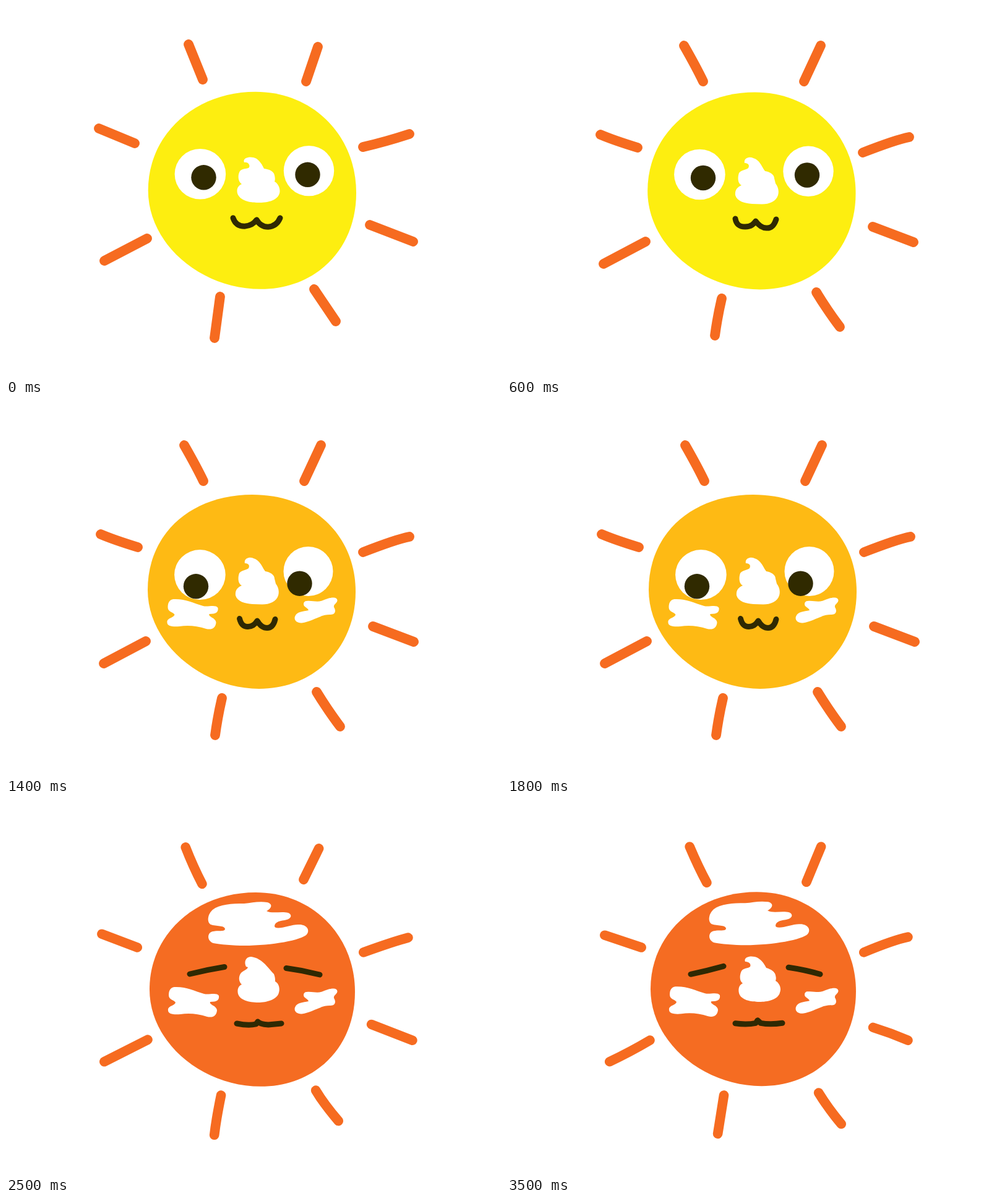
These frames come from a looping animation (800 by 600 pixels, 3600 ms). An HTML page:

```html
<!DOCTYPE html>
<html lang="en">
<head>
<meta charset="utf-8">
<title>Sunscreen sun</title>
<style>
  html, body { margin: 0; width: 100%; height: 100%; overflow: hidden; background: #fff; }
  svg { display: block; width: 800px; height: 600px; }
  .line { fill: none; stroke-width: 9; stroke: #2f2903; stroke-linecap: round; stroke-linejoin: round; }
  #rays { fill: none; stroke: #f66b20; stroke-width: 15.8; stroke-linecap: round; }
  .white, #nose { fill: #fff; }
  .pupil { fill: #302a00; }
</style>
</head>
<body>
<svg viewBox="0 0 800 600">
  <defs>
    <path id="body" d="M403 139C495 139 565 209 565 302C565 393 500 457 411 457C317 457 230 386 230 298C230 206 307 139 403 139Z"/>
    <path id="cheekL" d="M272 296C290 295 304 302 320 307C328 309 340 304 344 310C345 317 341 320 330 320C328 325 341 326 341 334C340 343 334 346 325 344C310 339 295 338 282 340C272 341 262 340 262 334C261 326 272 327 274 321C272 317 263 317 263 309C263 301 266 297 272 296Z"/>
    <path id="cheekR" d="M486 304C496 303 503 307 512 303C520 299 535 295 535.5 303C535 308 529 309 530 314C534 320 532 327 523 326C508 326 495 337 478 339.5C470 340 465 335 467 329C470 321 480 321 489 319C487 314 481 314 481 309C481 306 483 304 486 304Z"/>
  </defs>

  <g id="rays">
    <path data-pose="0" d="M295 62L318 119M504 66L485 122M150 198L208 222M577 228Q612 220 652 207M588 354L658 381M228 376L159 412M346 470L337 537M498 458L533 510"/>
    <path data-pose="1" d="M287 63Q299 94 314 123M505 65L480 116M150 205L208 227M578 235Q628 217 651 211M591 353L658 379M225 378L154 414M345 469Q337 508 334 534M500 461Q513 483 537 511"/>
    <path data-pose="2" d="M286 64Q306 99 317 122M507 64L480 122M151 208Q172 217 211 229M575 237Q629 216 650 212M591 357L657 382M224 381L156 417M347 473Q340 503 336 533M500 463Q519 494 538 519"/>
    <path data-pose="3" d="M292 62Q306 95 320 121M507 62L483 120M153 207L213 227M577 235Q625 215 649 210M592 358Q621 367 649 379M227 379Q195 398 161 414M348 469L338 532M503 465Q519 491 540 516"/>
  </g>

  <g id="face">
    <g data-mood="0">
      <use href="#body" fill="#fdee10" transform="translate(227.2 139.5) scale(1.004 1.003) translate(-230 -139)"/>
      <g class="white">
        <ellipse cx="311.4" cy="272.5" rx="41.3" ry="40.8"/>
        <circle cx="487" cy="267.3" r="40.7"/>
      </g>
      <g class="pupil">
        <circle cx="317" cy="278" r="20.2"/>
        <circle cx="485" cy="273.5" r="20.2"/>
      </g>
      <path class="line" data-pose="013" d="M364.5 343.5Q369 357 383 357Q396 356 402.5 346.5Q409 358 421 358Q435 357 440.5 343.5"/>
      <path class="line" data-pose="2" d="M369 344C371 355 377 357 385 357C395 357 399 352 402 348C407 355 412 359 419 359C428 360 432 354 435 345"/>
    </g>

    <g data-mood="1">
      <path fill="#feba14" d="M398 145C498 145 565 212 565 302C565 393 498 459 409 459C317 459 229 386 229 299C229 207 300 145 398 145Z"/>
      <g class="white">
        <ellipse cx="313.4" cy="274.6" rx="41.3" ry="40.5"/>
        <circle cx="488.5" cy="269" r="40"/>
        <use href="#cheekL" x="-1.5" y="18"/>
        <use href="#cheekR" x="0" y="13"/>
      </g>
      <g class="pupil">
        <circle cx="307" cy="293.3" r="20.2"/>
        <circle cx="474.5" cy="288.7" r="20.2"/>
      </g>
      <path class="line" d="M377.5 345.5C380 356 385 358.5 391 358.5C398 358.5 403 354 406 349C410 356 416 360.5 422 360.5C429 360.5 433 355 435 346.5"/>
    </g>

    <g data-mood="2" transform="translate(-1 0)">
      <use href="#body" fill="#f56c22" transform="translate(232 143) scale(.991 .987) translate(-230 -139)"/>
      <g class="white">
        <path d="M385 161C397 160 408 157 422 159C433 162 428 170 421 173C430 178 445 173 456 176C463 179 462 186 450 188C440 189 434 192 434 198C437 205 460 195 472 195C486 194 492 204 486 211C478 220 430 229 385 229C368 229 345 227 335 225C324 221 325 207 335 206C343 204 354 207 354 202C353 196 340 198 331 195C324 191 326 178 334 171C345 162 365 161 385 161Z"/>
        <use href="#cheekL"/>
        <use href="#cheekR"/>
      </g>
      <path class="line" data-pose="12" d="M297 275Q325 268 353 263.5M453 265.5Q480 269 507 276M373 355Q392 359 404 356L407 352Q410 356 424 357L445 355"/>
      <path class="line" data-pose="03" d="M297 276Q325 270 350 263M455 265Q482 269 506 276M369 355.5Q388 358 402 355L405 350.5L410 355Q425 358 445 355"/>
    </g>
  </g>

  <g id="nose">
    <path data-pose="0" d="M385 253C382 246 392 243 400 245C409 247 414 257 417 263C425 264 433 267 434 274C435 279 435 281 434 284C440 287 444 296 442 303C438 316 420 318 408 318C394 318 378 315 374 303C372 295 376 290 381 288C375 284 374 274 378 267C382 262 390 264 393 261C395 256 390 252 385 253Z"/>
    <path data-pose="1" d="M388 263C384 255 388 247 396 247C414 249 424 266 433 275C435 280 435 283 435 287C441 290 443 298 441 305C438 317 420 321 408 321C392 321 378 317 375 307C373 299 377 293 381 292C375 286 376 278 380 273C384 269 390 268 391 264Z"/>
    <path data-pose="2" d="M384 254C382 246 392 243 398 246C409 249 412 261 417 267C424 268 432 272 432 279L434 287C438 292 440 299 438 306C435 316 424 320.5 412 320.5L396 320C384 319 372 316 369 306C368 298 372 293 379 290C372 286 373 276 375 270C379 265 387 265 390 262C393 256 388 254 384 254Z"/>
    <path data-pose="3" d="M385 255C382 248 392 245 400 247C410 249 416 259 419 265C426 267 433 271 434 277C435 281 435 283 434 286C440 289 444 298 441 305C438 317 420 320 408 320C394 320 378 317 375 306C373 298 376 292 381 290C375 286 376 276 379 270C382 265 390 266 393 263C395 258 390 255 385 255Z"/>
  </g>
</svg>
<script>
  const STEP = 100, POSES = 4, MOOD_STEPS = 12, MOODS = 3;
  const rayShift = ["", "translate(2 1)", "translate(6.7 7.7) scale(.988)"];
  const noseShift = ["", "translate(2 2)", ""];
  const wobble = ["translate(2.5 -.7)", "translate(1 0)", "", "translate(1 -.7)"];
  const [rays, face, nose] = ["rays", "face", "nose"].map(id => document.getElementById(id));

  function show(key, value) {
    for (const el of document.querySelectorAll(`[data-${key}]`))
      el.style.display = el.dataset[key].includes(value) ? "" : "none";
  }

  function draw(step) {
    const mood = Math.floor(step / MOOD_STEPS), pose = step % POSES;
    show("mood", mood);
    show("pose", pose);
    rays.setAttribute("transform", rayShift[mood]);
    nose.setAttribute("transform", noseShift[mood]);
    face.setAttribute("transform", wobble[pose]);
  }

  let last = 0;
  const start = performance.now();
  function tick() {
    const elapsed = performance.now() - start;
    const step = Math.floor(elapsed / STEP) % (MOOD_STEPS * MOODS);
    if (step !== last) draw(last = step);
    requestAnimationFrame(tick);
  }
  draw(0);
  requestAnimationFrame(tick);
</script>
</body>
</html>
```
